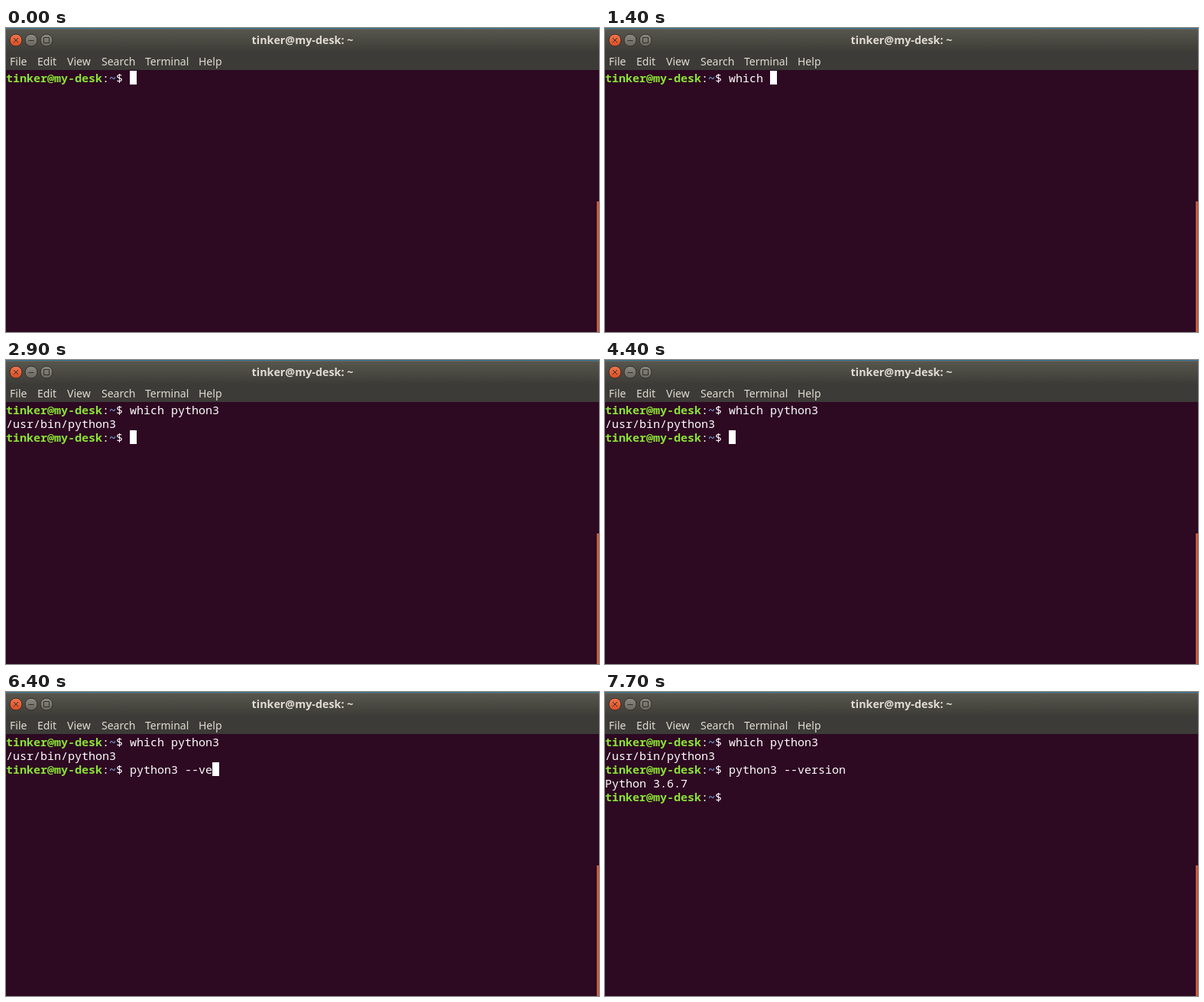
These frames come from a looping animation (776 px wide and 398 px high, 8000 ms). An HTML page:

```html
<!DOCTYPE html>
<html lang="en">
<head>
<meta charset="utf-8">
<title>Terminal</title>
<style>
  html, body { margin: 0; width: 100%; height: 100%; overflow: hidden; background: #2d0922; }
  svg { display: block; width: 100vw; height: 100vh; }
  text { white-space: pre; }
  .ui { font: 14px "Noto Sans", "Open Sans", sans-serif; fill: #dfdbd2; }
  .title { font-size: 14.3px; font-weight: 700; text-anchor: middle; }
  .term { font: 15px "Noto Sans Mono", "Liberation Mono", monospace; fill: #fff; }
  .user { fill: #8ae234; font-weight: 700; }
  .dir { fill: #729fcf; font-weight: 700; }
</style>
</head>
<body>
<svg viewBox="0 0 776 398" preserveAspectRatio="none">
  <defs>
    <linearGradient id="bar" x2="0" y2="1">
      <stop offset="0" stop-color="#59584f"/>
      <stop offset="1" stop-color="#3d3c37"/>
    </linearGradient>
    <linearGradient id="close" x2="0" y2="1">
      <stop offset="0" stop-color="#f0764f"/>
      <stop offset="1" stop-color="#dc4c20"/>
    </linearGradient>
    <linearGradient id="grey" x2="0" y2="1">
      <stop offset="0" stop-color="#8b8980"/>
      <stop offset="1" stop-color="#68665e"/>
    </linearGradient>
  </defs>
  <rect width="776" height="398" fill="#2d0922"/>
  <rect width="776" height="55" fill="#3c3b37"/>
  <rect width="776" height="31" fill="url(#bar)"/>
  <rect y="1" width="776" height="1" fill="#696860"/>
  <rect width="776" height="1" fill="#2b6d91"/>
  <g stroke="#302f2b">
    <circle cx="13" cy="16" r="8" fill="url(#close)"/>
    <circle cx="33" cy="16" r="8" fill="url(#grey)"/>
    <circle cx="53" cy="16" r="8" fill="url(#grey)"/>
    <path d="M10 13l6 6m0-6l-6 6M29.5 16.5h7M49.5 12.5h7v7h-7z" fill="none"/>
  </g>
  <text class="ui title" x="388" y="21">tinker@my-desk: ~</text>
  <g class="ui" id="menu"></g>
  <rect x="773" y="227" width="3" height="171" fill="#c6583b"/>
  <g class="term" id="screen"></g>
  <rect id="cursor" width="9" height="18" fill="#fff"/>
</svg>
<script>
const LOOP = 8000, CELL = 9, ROW = 18, TOP = 56, PROMPT = 18;
const screen = document.getElementById("screen");
const cursor = document.getElementById("cursor");

// Typing steps: [time, characters visible]
const sessions = [
  { start: 0, enter: 2900, command: "which python3", output: "/usr/bin/python3",
    typing: [[800, 2], [900, 3], [1100, 4], [1200, 5], [1400, 6], [1900, 8],
             [2100, 9], [2200, 10], [2300, 11], [2400, 12], [2800, 13]] },
  { start: 2900, enter: 7500, command: "python3 --version", output: "Python 3.6.7",
    typing: [[4800, 1], [5000, 3], [5100, 4], [5200, 5], [5500, 6], [5600, 7], [6000, 8],
             [6200, 10], [6300, 11], [6400, 12], [6600, 14], [6700, 15], [6800, 16], [6900, 17]] },
  { start: 7500, enter: Infinity, command: "", output: "", typing: [] }
];
const hidden = [[200, 600], [3400, 4400], [4600, 4800], [7700, 8000]];

document.getElementById("menu").innerHTML =
  [["File", 5], ["Edit", 41], ["View", 80], ["Search", 125], ["Terminal", 182], ["Help", 252]]
    .map(([label, x]) => `<text x="${x}" y="49">${label}</text>`).join("");

const line = (row, body) => `<text x="0" y="${TOP + 15 + row * ROW}">${body}</text>`;
const prompt = '<tspan class="user">tinker@my-desk</tspan>:<tspan class="dir">~</tspan>$ ';

let shown = "";

function draw(t) {
  let markup = "", row = 0;
  for (const s of sessions) {
    if (t < s.start) break;
    const count = s.typing.reduce((n, [at, chars]) => t >= at ? chars : n, 0);
    markup += line(row, prompt + s.command.slice(0, count));
    if (t >= s.enter) {
      markup += line(row + 1, s.output);
      row += 2;
    } else {
      cursor.setAttribute("x", (PROMPT + count) * CELL);
      cursor.setAttribute("y", TOP + row * ROW);
    }
  }
  if (markup !== shown) screen.innerHTML = shown = markup;
  const off = hidden.some(([from, to]) => t >= from && t < to);
  cursor.setAttribute("visibility", off ? "hidden" : "visible");
}

const origin = performance.now();
function tick() {
  draw((performance.now() - origin) % LOOP);
  requestAnimationFrame(tick);
}
tick();
</script>
</body>
</html>
```
